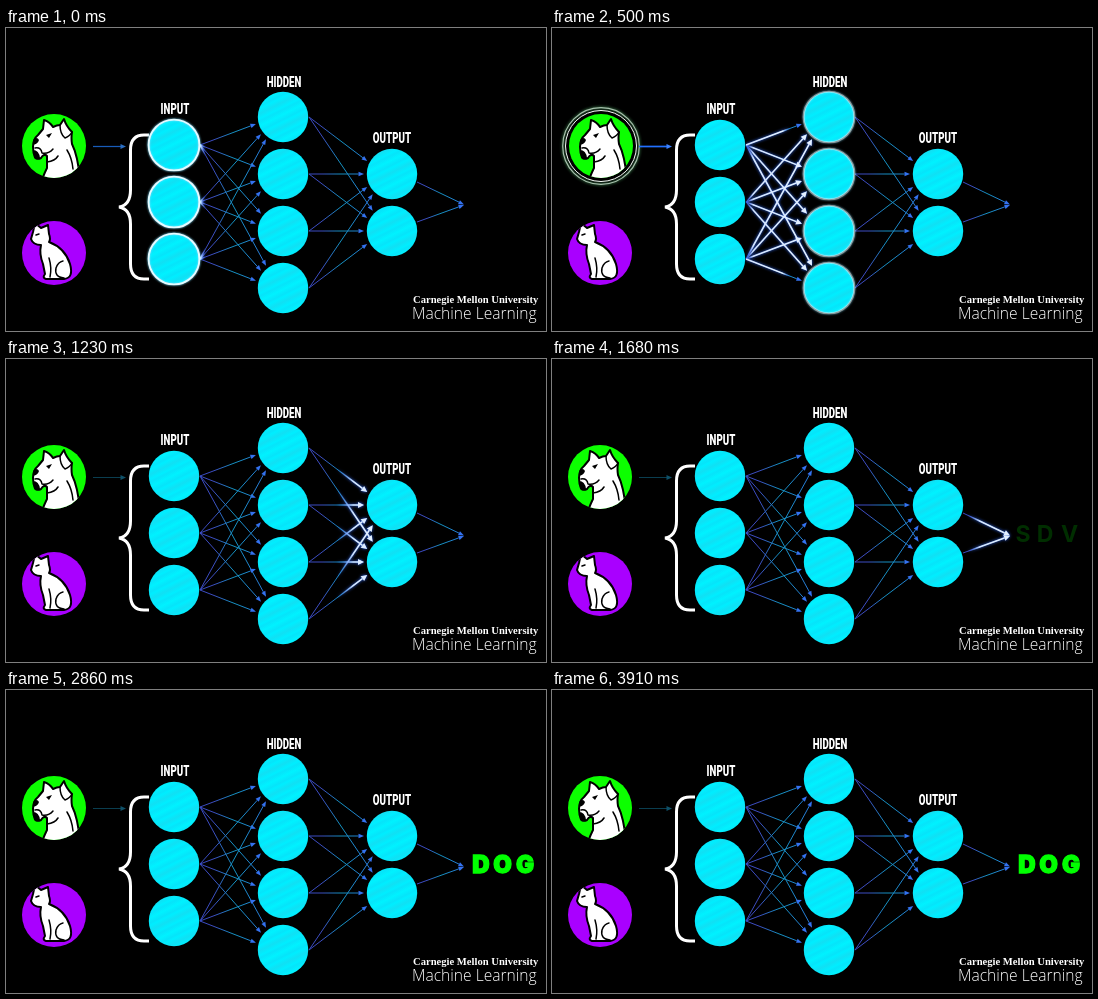
Animation of 540 by 303 pixels, one loop 3960 ms. Source, as an HTML page:

```html
<!DOCTYPE html>
<html lang="en">
<head>
<meta charset="utf-8">
<title>Neural network</title>
<style>
  html, body { margin: 0; width: 100%; height: 100%; overflow: hidden; background: #000; }
  svg { display: block; width: 540px; height: 303px; }
  .label { font: 800 15px Roboto, "Liberation Sans", sans-serif; fill: #fff; text-anchor: middle; }
  .school { font: 700 10.6px "Liberation Serif", serif; fill: #fff; }
  .course { font: 340 15.6px "Open Sans", sans-serif; fill: #fff; }
  .word { font: 900 24px Inter, "Open Sans", sans-serif; fill: #0f0; stroke: #0f0; text-anchor: middle; }
  .ink { fill: #fff; stroke: #000; stroke-width: 2; stroke-linejoin: round; }
  .detail { fill: none; stroke: #000; stroke-width: 1.5; stroke-linecap: round; stroke-linejoin: round; }
  .pulse { filter: drop-shadow(0 0 1.4px #2f6bff); }
  .ring { fill: none; stroke: #e6faff; stroke-width: 1.9; filter: drop-shadow(0 0 0.8px #7fdfff); }
</style>
</head>
<body>
<svg id="stage" viewBox="0 0 540 303">
  <defs>
    <linearGradient id="skin" gradientUnits="userSpaceOnUse" x1="0" y1="0" x2="5" y2="10" spreadMethod="reflect">
      <stop offset="0" stop-color="#00f2ff"/>
      <stop offset="0.4" stop-color="#06e4fa"/>
      <stop offset="0.6" stop-color="#00eeff"/>
      <stop offset="1" stop-color="#10e0f4"/>
    </linearGradient>
    <clipPath id="dogClip"><circle cx="48" cy="118" r="32"/></clipPath>
    <clipPath id="catClip"><circle cx="48" cy="225" r="32"/></clipPath>
  </defs>
  <rect width="540" height="303"/>

  <g id="halo" fill="none" stroke="#fff">
    <circle cx="49" cy="118" r="35.5"/>
    <circle cx="49" cy="118" r="38.3" stroke="#dfffe6" stroke-width="1.2" opacity="0.75"
      style="filter: drop-shadow(0 0 1.5px #7f9)"/>
  </g>
  <g id="dog">
    <circle cx="48" cy="118" r="32" fill="#0cff00"/>
    <g clip-path="url(#dogClip)">
      <path class="ink" d="M27 119Q27 111 32 107L37 101L38 92Q44 94 47 99Q51 97 54 97L58 91Q60 98 66 104Q65 110 66 116Q72 128 74 152H36Q38 146 41 140V128Q38 125 35 130Q31 132 29 129Q27 125 27 119Z"/>
      <path class="detail" d="M29 120Q35 119 36 125Q43 126 47 121M54 97Q54 106 59 110Q64 108 66 104M41 134Q49 133 52 128M61 122Q66 130 67 141"/>
      <path d="M27 112Q31 108 33 112Q32 116 27 117ZM40 107L46 105L43 110ZM27 122Q33 122 34 130Q31 133 28 130Z"/>
    </g>
  </g>
  <g>
    <circle cx="48" cy="225" r="32" fill="#a900ff"/>
    <g clip-path="url(#catClip)">
      <path class="ink" d="M25 211L27 204L29 195L35 200L42 197L43 206Q45 211 43 214Q59 220 64 236Q68 250 58 251H40Q36 250 39 246L37 236Q33 226 35 217Q27 217 25 211Z"/>
      <path class="detail" d="M43 230Q46 240 44 249M58 250Q48 249 50 240Q52 234 57 233M30 207L33 206"/>
    </g>
  </g>

  <path d="M143 107H138Q124.500 107 124.500 122V162Q124.500 177 113 179Q124.500 181 124.500 196V236Q124.500 251 138 251H143"
    fill="none" stroke="#fff" stroke-width="3"/>
  <g id="feed"><path d="M87 118.500H116"/><path d="M120 118.500L114.500 116V121Z" stroke="none"/></g>
  <g id="net"></g>

  <g id="labels"></g>
  <text class="school" x="407" y="275">Carnegie Mellon University</text>
  <text class="course" x="406" y="291">Machine Learning</text>
  <text class="word" id="word" y="182.500"></text>
</svg>
<script>
const LOOP = 3960;
const NS = "http://www.w3.org/2000/svg";
const byId = id => document.getElementById(id);

function add(parent, tag, attrs) {
  const el = document.createElementNS(NS, tag);
  for (const k in attrs) el.setAttribute(k, attrs[k]);
  parent.appendChild(el);
  return el;
}

// Piecewise linear value at time t from [time, value] steps.
function track(t, steps) {
  if (t <= steps[0][0]) return steps[0][1];
  for (let i = 1; i < steps.length; i++) {
    const [a, va] = steps[i - 1], [b, vb] = steps[i];
    if (t <= b) return va + (vb - va) * (t - a) / (b - a);
  }
  return steps[steps.length - 1][1];
}

const mix = (a, b, k) => `rgb(${a.map((v, i) => Math.round(v + (b[i] - v) * k))})`;

const net = byId("net"), defs = document.querySelector("defs");
const column = (x, ...ys) => ys.map(y => ({ x, y }));
const input = column(168, 117, 174, 231);
const hidden = column(277, 89, 146, 203, 260);
const output = column(386, 146, 203);

// Edge from the right side of one node to the near rim of another.
function edge(a, b) {
  const dx = b.x - a.x, dy = b.y - a.y, k = 28 / Math.hypot(dx, dy);
  return { x1: a.x + 26, y1: a.y, x2: b.x - dx * k, y2: b.y - dy * k };
}
const link = (from, to) => from.flatMap(a => to.map(b => edge(a, b)));
const outer = (a, b) => (a === input[0] && b === hidden[0]) || (a === input[2] && b === hidden[3]);

const first = [], late = [];
for (const a of input) for (const b of hidden) (outer(a, b) ? late : first).push(edge(a, b));
const second = link(hidden, output);
const last = [{ x1: 411, y1: 154, x2: 458, y2: 176.5 }, { x1: 411, y1: 194, x2: 458, y2: 177 }];

function gradient(id, x1, x2, stops) {
  const g = add(defs, "linearGradient", { id, gradientUnits: "userSpaceOnUse", x1, x2, y1: 0, y2: 0 });
  return stops.map(([offset, color, alpha]) =>
    add(g, "stop", { offset, "stop-color": color, "stop-opacity": alpha }));
}

function drawEdge(parent, e, paint, width, tip, len, half) {
  const d = Math.hypot(e.x2 - e.x1, e.y2 - e.y1);
  const ux = (e.x2 - e.x1) / d, uy = (e.y2 - e.y1) / d;
  const bx = e.x2 - ux * len, by = e.y2 - uy * len;
  add(parent, "line", { x1: e.x1, y1: e.y1, x2: bx, y2: by, stroke: paint, "stroke-width": width });
  add(parent, "path", {
    fill: tip,
    d: `M${e.x2} ${e.y2}L${bx - uy * half} ${by + ux * half}L${bx + uy * half} ${by - ux * half}Z`
  });
}

// Resting lines, then a light pulse whose lit span runs from tail to head.
const pulses = [
  { edges: first, x: [194, 261], head: [[0, 0.02], [420, 1.1]], tail: [[0, -0.2], [480, -0.15], [760, 1.25]] },
  { edges: late, x: [194, 261], head: [[60, 0], [500, 0.6], [640, 1.1]], tail: [[0, -0.2], [500, -0.15], [800, 1.25]] },
  { edges: second, x: [303, 366], head: [[800, -0.1], [860, 0.28], [1060, 1.1]], tail: [[860, -0.2], [1230, 0.55], [1430, 1.25]] },
  { edges: last, x: [411, 458], head: [[1430, -0.1], [1620, 1.1]], tail: [[1560, -0.2], [1680, 0.2], [1920, 1.25]] }
];

pulses.forEach((p, i) => {
  gradient("rest" + i, ...p.x, [[0, "#3a4cc4", 1], [0.2, "#3d4cc0", 1], [0.5, "#1492c0", 1], [1, "#2c78dc", 1]]);
  for (const e of p.edges) drawEdge(net, e, `url(#rest${i})`, 1, "#3472f0", 5.5, 2.2);
});
pulses.forEach((p, i) => {
  p.stops = gradient("lit" + i, ...p.x, [[0, "#2f6bff", 0], [0, "#d4e6ff", 1], [0, "#e6f1ff", 1], [0, "#2f6bff", 0]]);
  p.group = add(net, "g", { class: "pulse" });
  for (const e of p.edges) drawEdge(p.group, e, `url(#lit${i})`, 1.6, `url(#lit${i})`, 6, 3);
});

const rings = [
  { nodes: input, glow: [[0, 1], [120, 1], [430, 0]] },
  { nodes: hidden, glow: [[330, 0], [500, 0.6], [700, 1], [900, 1], [1160, 0]] },
  { nodes: output, glow: [[1230, 0], [1380, 1], [1480, 1], [1660, 0]] }
];
for (const r of rings) {
  for (const n of r.nodes) add(net, "circle", { cx: n.x, cy: n.y, r: 25.2, fill: "url(#skin)" });
  r.group = add(net, "g", {});
  for (const n of r.nodes) add(r.group, "circle", { cx: n.x, cy: n.y, r: 25.4, class: "ring" });
}

// Condensed capitals.
for (const [text, x, y] of [["INPUT", 169, 86], ["HIDDEN", 278, 58.5], ["OUTPUT", 386, 115]])
  add(byId("labels"), "text", { class: "label", transform: `translate(${x} ${y}) scale(.65 1)` }).textContent = text;

const WORD = "DOG", SCRAMBLE = ["SDV", "SKQ", "RPC", "BHO", "DUE", "COG", "GQG"];
const SETTLE = [2280, 2220, 2130];

function drawWord(t) {
  const word = byId("word");
  if (t < 1660) { word.setAttribute("opacity", 0); return; }
  const step = SCRAMBLE[Math.floor((t - 1660) / 90) % SCRAMBLE.length];
  word.textContent = [...WORD].map((c, i) => t < SETTLE[i] ? step[i] : c).join("");
  const k = track(t, [[1680, 0], [2150, 1]]);
  const xs = [471 + 4 * k, 493 + 3.5 * k, 517.5 + 1.5 * k];
  word.setAttribute("x", xs.join(" "));
  word.setAttribute("opacity", track(t, [[1660, 0.1], [1680, 0.18], [2150, 1]]));
  word.style.fontWeight = k < 0.5 ? 700 : 900;
  word.style.fontSize = 23 + k + "px";
  word.style.strokeWidth = 1.3 * k;
}

function draw(t) {
  for (const p of pulses) {
    const head = track(t, p.head), tail = track(t, p.tail);
    const lit = head > 0 && tail < 1.2;
    p.group.style.display = lit ? "" : "none";
    if (!lit) continue;
    [tail - 0.12, tail + 0.15, head - 0.06, head + 0.06].reduce((prev, v, i) => {
      const at = Math.max(prev, v);
      p.stops[i].setAttribute("offset", Math.min(1, Math.max(0, at)));
      return at;
    }, -1);
    // Keep the ends lit while the span reaches past the line.
    p.stops[0].setAttribute("stop-opacity", tail < -0.1 ? 1 : 0);
    p.stops[3].setAttribute("stop-opacity", head > 1 && tail < 0.95 ? 1 : 0);
    p.stops[3].setAttribute("stop-color", head > 1 ? "#fff" : "#2f6bff");
    p.group.style.opacity = track(tail, [[0.8, 1], [1.2, 0]]);
  }
  for (const r of rings) r.group.setAttribute("opacity", track(t, r.glow));

  const pop = track(t, [[80, 0], [430, 1], [560, 1], [800, 0]]);
  byId("halo").setAttribute("opacity", pop);
  byId("dog").setAttribute("transform", `translate(${pop} 0)`);

  const lit = track(t, [[0, 0.6], [400, 1], [540, 1], [840, 0]]);
  const feed = byId("feed");
  feed.setAttribute("stroke", mix([10, 62, 80], [34, 112, 255], lit));
  feed.setAttribute("fill", mix([14, 80, 104], [60, 130, 255], lit));
  feed.setAttribute("stroke-width", 1 + 0.7 * lit * lit);
  drawWord(t);
}

const start = performance.now();
function tick() {
  draw((performance.now() - start) % LOOP);
  requestAnimationFrame(tick);
}
tick();
</script>
</body>
</html>
```
